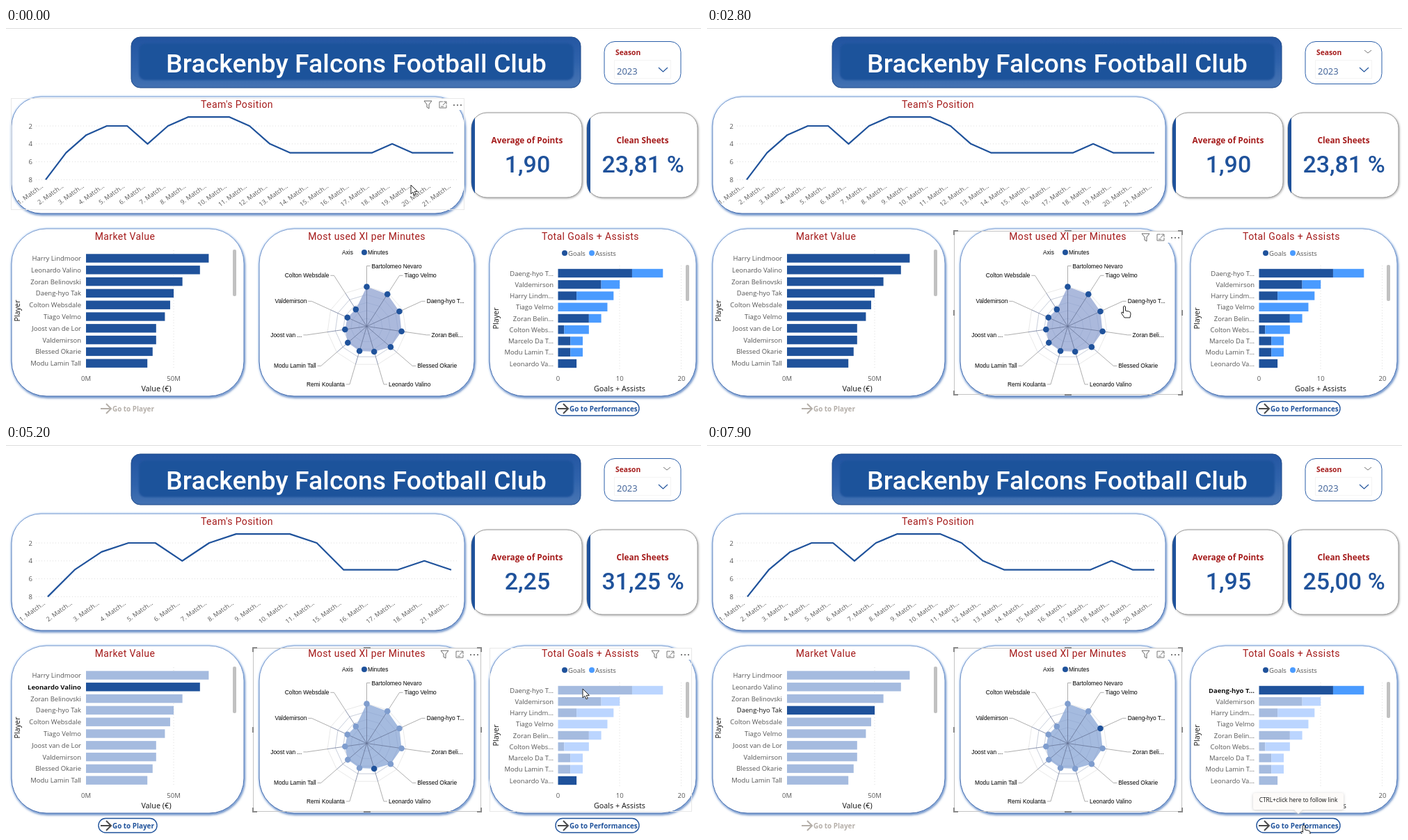
An HTML page that plays this animation: 999 by 560 pixels, repeating every 8000 ms.

```html
<!DOCTYPE html>
<html lang="en">
<head>
<meta charset="utf-8">
<title>Club dashboard</title>
<style>
  html, body { margin: 0; width: 100%; height: 100%; overflow: hidden; background: #fff; }
  svg { display: block; font-family: "Open Sans", "Noto Sans", sans-serif; }
  text { white-space: pre; }
  .din { font-family: Roboto, sans-serif; }
  .strong { font-weight: 500; }
  .arial { font-family: "Liberation Sans", Arial, sans-serif; }
  .title { letter-spacing: .4px; }
  .panel { fill: #fff; stroke: url(#edge); stroke-width: 1;
    filter: drop-shadow(0 0 1.5px #a4c8f4) drop-shadow(1px 2px 1.2px #6f90c4); }
  .card { fill: #fff; stroke: #999; filter: drop-shadow(1px 1px 1.5px #aaa); }
  .tip { filter: drop-shadow(0 1px 2px #ccc); }
</style>
</head>
<body>
<svg id="stage" width="999" height="560" viewBox="0 0 999 560"></svg>
<script>
const LOOP = 8000, STEP = 100;
const NAVY = '#1f529b', SKY = '#4a9bff', PALE = '#a5bbdf', PALE_SKY = '#bbd5ff';
const RED = '#a51c1c', GREY = '#555', INK = '#111';

const market = [['Harry Lindmoor', 70], ['Leonardo Valino', 65], ['Zoran Belinovski', 55],
  ['Daeng-hyo Tak', 50], ['Colton Websdale', 48], ['Tiago Velmo', 45], ['Joost van de Lor', 40],
  ['Valdemirson', 40], ['Blessed Okarie', 38], ['Modu Lamin Tall', 35]];
const minutes = [['Bartolomeo Nevaro', 57], ['Tiago Velmo', 55], ['Daeng-hyo T...', 51.6],
  ['Zoran Beli...', 50.6], ['Blessed Okarie', 45.5], ['Leonardo Valino', 38], ['Remi Koulanta', 37],
  ['Modu Lamin Tall', 36], ['Joost van ...', 31.5], ['Valdemirson', 30.5], ['Colton Websdale', 29]];
const goals = [['Daeng-hyo T...', 12, 5], ['Valdemirson', 7, 3], ['Harry Lindm...', 3, 6],
  ['Tiago Velmo', 0, 8], ['Zoran Belin...', 5, 2], ['Colton Webs...', 1, 4],
  ['Marcelo Da T...', 2, 2], ['Modu Lamin T...', 2, 2], ['Leonardo Va...', 3, 0]];
const positions = [8, 5, 3, 2, 2, 4, 2, 1, 1, 1, 2, 4, 5, 5, 5, 5, 5, 4, 5, 5, 5];
const rounds = positions.map((_, i) => i + 1);

// Filter results: rounds played, first and last x, average points, clean sheets
const filters = [
  { list: rounds, x0: 57, x1: 643, avg: '1,90', clean: '23,81 %' },
  { list: rounds.filter(r => r < 12 || r > 14 && r < 19 || r > 20), x0: 60, x1: 640, avg: '2,25', clean: '31,25 %' },
  { list: rounds.slice(0, 20), x0: 58, x1: 643, avg: '1,95', clean: '25,00 %' }];

// Visual areas: left, top, right, bottom
const areas = { line: [7, 101, 659, 262], market: [7, 292, 336, 529],
  radar: [355, 292, 683, 528], goals: [695, 292, 986, 528] };

// Pointer: time, x, y
const path = [[0, 582, 226], [900, 582, 226], [1700, 609, 382], [1800, 609, 382], [2100, 600, 400],
  [2800, 600, 400], [3300, 192, 352], [4400, 192, 352], [5200, 829, 351], [6500, 829, 351],
  [7100, 838, 379], [7300, 846, 440], [7600, 858, 547], [8000, 858, 547]];

const rect = (x, y, w, h, fill, more = '') =>
  `<rect x="${x}" y="${y}" width="${w}" height="${h}" fill="${fill}" ${more}/>`;
const box = (cls, x, y, x2, y2, r) =>
  `<rect class="${cls}" x="${x}" y="${y}" width="${x2 - x}" height="${y2 - y}" rx="${r}"/>`;
const dot = (x, y, r, fill) => `<circle cx="${x}" cy="${y}" r="${r}" fill="${fill}"/>`;
const line = (d, stroke, w = 1, more = '') =>
  `<path d="${d}" fill="none" stroke="${stroke}" stroke-width="${w}" ${more}/>`;
const text = (x, y, s, size = 9.5, fill = GREY, anchor = 'start', more = '') =>
  `<text x="${x}" y="${y}" font-size="${size}" fill="${fill}" text-anchor="${anchor}" ${more}>${s}</text>`;
const title = (x, y, s) => text(x, y, s, 14, RED, 'middle', 'class="din title"');
const bold = on => on ? 'font-weight="700"' : '';
const dotted = d => line(d, '#dedede', 1, 'stroke-dasharray="1 3"');
const axisTitle = (x, y, s, more) => text(x, y, s, 10.8, INK, 'middle', more);
const upright = (x, y, s) => axisTitle(x, y, s, `transform="rotate(-90 ${x} ${y})"`);

function header(chevron) {
  return line('M0 .5H999', '#ddd') +
    rect(180, 13, 646, 73, 'url(#bevel)', 'rx="13" stroke="#1d4889"') +
    rect(191, 22, 625, 53, NAVY, 'rx="9" filter="url(#soft)"') +
    text(503.5, 63.5, 'Brackenby Falcons Football Club', 37.5, '#fff', 'middle', 'class="din strong"') +
    rect(860, 19.5, 110, 61, '#fff', `rx="15" stroke="#2a5ea9"`) +
    text(876, 39, 'Season', 10.3, RED, 'start', bold(1)) +
    rect(874.5, 46.5, 81, 26, 'none', 'stroke="#f4f4f4"') +
    text(878, 67, '2023', 13, '#3c5f96') +
    line('M938 57l6.5 6 6.5-6', NAVY, 1.1) +
    (chevron ? line('M945 32l5 4 5-4', '#777') : '');
}

function lineChart(f) {
  const y = v => 141 + (v - 2) * 12.9;
  const step = (f.x1 - f.x0) / (f.list.length - 1), x = i => f.x0 + i * step;
  let s = box('panel', 8, 99, 659, 267, 42) + title(332, 115, "Team's Position");
  for (const v of [2, 4, 6, 8])
    s += dotted(`M43 ${y(v)}H648`) + text(38, y(v) + 3.5, v, 9.5, GREY, 'end');
  f.list.forEach((r, i) => s += text(x(i) - 3, 229, r + '. Match...', 9, GREY, 'end',
    `transform="rotate(-36 ${x(i) - 3} 229)"`));
  return s + line('M' + f.list.map((r, i) => `${x(i)} ${y(positions[r - 1])}`).join('L'),
    NAVY, 2.2, 'stroke-linejoin="round"');
}

function card(x, name, value) {
  return box('card', x, 122, x + 159, 244, 22) +
    `<path d="M${x} 144q0-8 5-15v109q-5-7-5-16z" fill="${NAVY}"/>` +
    text(x + 80, 166, name, 11.8, RED, 'middle', bold(1)) +
    text(x + 80.5, 208, value, 34, NAVY, 'middle', 'class="din strong"');
}

function marketChart(sel) {
  let s = box('panel', 8, 289, 342, 530, 50) + title(171, 305, 'Market Value') + dotted('M241 320V492');
  market.forEach(([name, v], i) => {
    const y = 331.5 + i * 16.8, on = sel === i;
    s += text(108, y + 3.5, name, 9.5, on ? INK : GREY, 'end', bold(on && i === 1)) +
      rect(115, y - 6.2, v * 2.52, 12.4, sel < 0 || on ? NAVY : PALE);
  });
  return s + text(115, 508, '0M', 9.5, GREY, 'middle') + text(241, 508, '50M', 9.5, GREY, 'middle') +
    axisTitle(216, 523, 'Value (€)') + upright(20, 407, 'Player') +
    rect(326, 319, 5, 67, '#c1c1c1', 'rx="2"');
}

function radarChart(sel) {
  const at = (i, r) => {
    const a = i * 2 * Math.PI / minutes.length;
    return [518.5 + r * Math.sin(a), 429.5 - r * Math.cos(a)];
  };
  const ring = r => 'M' + minutes.map((m, i) => at(i, r(m)).join(' ')).join('L') + 'Z';
  const small = (x, y, s, anchor) => text(x, y, s, 8.4, '#000', anchor, 'class="arial"');
  let s = box('panel', 364, 289, 673, 530, 50) + title(518.5, 305, 'Most used XI per Minutes') +
    small(483, 326, 'Axis') + dot(515, 323, 4, NAVY) + small(520, 326, 'Minutes');
  for (let k = 1; k <= 5; k++) s += line(ring(() => k * 11.4), '#e2e2e2', .8);
  s += `<path d="${ring(m => m[1])}" fill="${sel < 0 ? '#abb9dc' : PALE}"/>`;
  for (let k = 1; k < 5; k++) s += line(ring(() => k * 11.4), '#8297c4', .6, 'opacity=".5"');
  minutes.forEach(([name], i) => {
    const [x, y] = at(i, 87), side = i < 6 ? 1 : -1;
    s += line(`M518.5 429.5L${at(i, 57).join(' ')}`, '#5d6b8d', .7) +
      line(`M${at(i, 57).join(' ')}L${x} ${y}h${side * 5}`, '#999', .8) +
      small(x + side * 7, y + 3, name, side > 0 ? 'start' : 'end');
  });
  minutes.forEach((m, i) => s += dot(...at(i, m[1]), 4.3, sel < 0 || sel === i ? NAVY : '#7f9dce'));
  return s;
}

function goalsChart(sel, dim) {
  const k = 8.87, x0 = 793.5;
  let s = box('panel', 695, 289, 992, 530, 50) + title(840, 305, 'Total Goals + Assists') +
    dot(803, 324, 4, NAVY) + text(808, 327.5, 'Goals') + dot(842, 324, 4, SKY) + text(847, 327.5, 'Assists') +
    dotted('M882 342V492M970.5 342V492');
  goals.forEach(([name, g, a], i) => {
    const y = 353 + i * 16.25, on = !dim || sel === i, strong = sel === i && i === 0;
    s += text(787, y + 3.5, name, 9.5, strong ? INK : GREY, 'end', bold(strong)) +
      rect(x0, y - 6.2, g * k, 12.4, on ? NAVY : PALE) +
      rect(x0 + g * k, y - 6.2, a * k, 12.4, on ? SKY : PALE_SKY);
  });
  for (const v of [0, 10, 20]) s += text(x0 + v * k, 508, v, 9.5, GREY, 'middle');
  return s + axisTitle(882, 523, 'Goals + Assists') + upright(708, 418, 'Player') +
    rect(977, 341, 5, 52, '#c1c1c1', 'rx="2"');
}

function button(x, w, name, on) {
  return (on ? rect(x, 537.5, w, 20.5, '#fff', `rx="10" stroke="${NAVY}" stroke-width="1.4"`) : '') +
    line(`M${x + 3} 548h15m-7-7l7 7-7 7`, on ? '#4a4a4a' : '#b5afa9', 2) +
    text(x + 20, 552, name, 9.9, on ? NAVY : '#b5afa9', 'start', bold(1));
}

function frame([x, y, x2, y2], selected) {
  const w = x2 - x, h = y2 - y, mx = x + w / 2, my = y + h / 2, ty = y + 9;
  const handles = `M${x} ${y + 6}V${y}H${x + 6}M${x2 - 6} ${y}H${x2}V${y + 6}M${x2} ${y2 - 6}V${y2}H${x2 - 6}` +
    `M${x + 6} ${y2}H${x}V${y2 - 6}M${mx - 5} ${y}h10M${mx - 5} ${y2}h10M${x} ${my - 4}v8M${x2} ${my - 4}v8`;
  return rect(x2 - 62, y + 1, 61, 16, '#fff') +
    rect(x + .5, y + .5, w - 1, h - 1, 'none', `stroke="${selected ? '#c4c4c4' : '#e8e8e8'}"`) +
    (selected ? line(handles, '#888', 2) : '') +
    line(`M${x2 - 58} ${ty - 5}h11l-4 5v6l-3-2v-4z`, '#666') +
    line(`M${x2 - 31} ${ty - 4}h-5v9h10v-4M${x2 - 30} ${ty - 4}h4v4M${x2 - 26} ${ty - 4}l-5 5M${x2 - 34} ${ty + 3}h4`, '#777') +
    [-15, -10, -5].map(d => dot(x2 + d, ty + 1, 1, '#555')).join('');
}

function detailTip() {
  const rows = [['player_name', 'Daeng-hyo Tak'], ['Goals', 12], ['Sum of Goals and Assists', 17]];
  return '<path d="M600 297H812V346L821 352 812 361H600Z" fill="#fff"/>' + rows.map(([a, b], i) =>
    text(721, 318 + i * 14.2, a, 9.5, '#333', 'end') + text(731, 318 + i * 14.2, b, 9.5, '#333')).join('');
}

const linkTip = () => '<path class="tip" d="M788 501H912q3 0 3 3V522q0 3-3 3H856l-6 6-6-6H788q-3 0-3-3V504q0-3 3-3Z" fill="#fdfbf9"/>' +
  text(850, 514, 'CTRL+click here to follow link', 8.4, INK, 'middle');

function pointer(x, y, hand) {
  const d = hand
    ? 'M-1.5 1q1.5-2 3 0v6l5 1q3 .5 2.5 4l-1 5H0l-4-6q-1-2 1-2l1.5 1.5z'
    : 'M0 0V13l3-2.8 2 4.6 2.2-1-2-4.4h4.2z';
  return `<path d="${d}" transform="translate(${x} ${y})" fill="#fff" stroke="#222" stroke-width="1"/>`;
}

function pointerAt(t) {
  const i = path.findIndex(p => p[0] > t), [t0, x0, y0] = path[i - 1], [t1, x1, y1] = path[i];
  const u = (t - t0) / (t1 - t0), e = u * u * (3 - 2 * u);
  return [x0 + (x1 - x0) * e, y0 + (y1 - y0) * e];
}

const defs = `<defs>
  <linearGradient id="bevel" x2=".12" y2="1"><stop stop-color="#2254a0"/>
    <stop offset=".6" stop-color="#2f62ab"/><stop offset="1" stop-color="#4472b2"/></linearGradient>
  <linearGradient id="edge" x2="0" y2="1"><stop stop-color="#7d9dcf"/>
    <stop offset="1" stop-color="#3a62a6"/></linearGradient>
  <filter id="soft"><feGaussianBlur stdDeviation="1"/></filter></defs>`;

function render(t) {
  const [px, py] = pointerAt(t);
  const during = (a, b) => t >= a && t < b;
  const filter = filters[t < 3900 ? 0 : t < 6800 ? 1 : 2];
  const marketSel = during(3700, 6500) ? 1 : t >= 6700 ? 3 : -1;
  const radarSel = t < 3900 ? -1 : t < 6800 ? 5 : 2;
  const goalsSel = during(3900, 6500) ? 8 : t >= 6600 ? 0 : -1;
  const selected = t < 700 ? '' : t < 2400 ? 'line' : 'radar';
  let s = defs + header(t >= 2400) + lineChart(filter) +
    card(669, 'Average of Points', filter.avg) + card(835, 'Clean Sheets', filter.clean) +
    marketChart(marketSel) + radarChart(radarSel) + goalsChart(goalsSel, t >= 3900) +
    button(133, 84, 'Go to Player', during(3700, 6500)) + button(790, 120, 'Go to Performances', true);
  for (const [name, a] of Object.entries(areas)) {
    const hover = px > a[0] && px < a[2] && py > a[1] && py < a[3];
    if (hover || name === selected) s += frame(a, name === selected);
  }
  if (during(5600, 6600)) s += detailTip();
  if (t >= 7900) s += linkTip();
  return s + pointer(px, py, during(1700, 2900) || t >= 7500);
}

const stage = document.getElementById('stage');
let last = -1;
function tick() {
  const t = Math.floor(performance.now() % LOOP / STEP) * STEP;
  if (t !== last) stage.innerHTML = render(last = t);
  requestAnimationFrame(tick);
}
tick();
</script>
</body>
</html>
```
